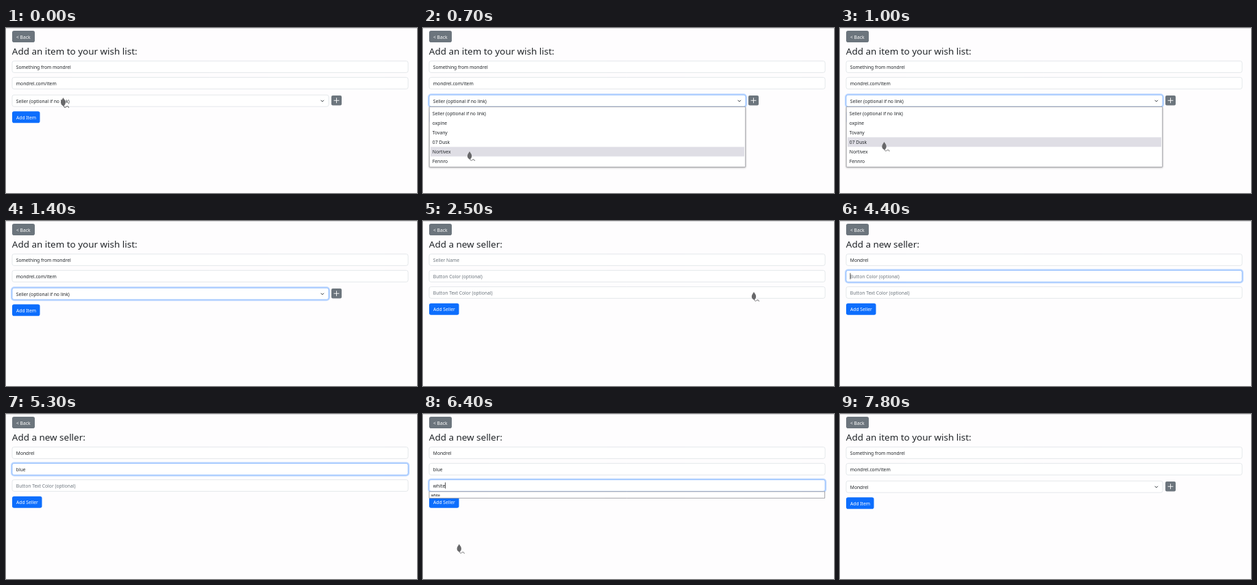
An HTML page with a canvas that plays this animation: 600 px wide and 242 px high, repeating every 7.9 s.

```html
<!DOCTYPE html>
<html lang="en">
<head>
<meta charset="utf-8">
<title>Wish list form</title>
<style>
html, body { margin: 0; width: 100%; height: 100%; overflow: hidden; background: #fefdfe; }
canvas { display: block; width: 600px; height: 242px; }
</style>
</head>
<body>
<canvas id="stage"></canvas>
<script>
const W = 600, H = 242, LOOP = 7900, STEP = 100;
const SHOP = 'Mondrel';
const SELLERS = ['Seller (optional if no link)', 'oxpine', 'Tovany', '07 Dusk', 'Nortivex', 'Fennro'];
const PAPER = '#fefdfe', INK = '#212529', MUTED = '#6c757d', GRAY = '#6c757d', BLUE = '#0d6efd';
const FONT = '"Noto Sans", "Open Sans", sans-serif';

const canvas = document.getElementById('stage');
const ctx = canvas.getContext('2d');
const dpr = window.devicePixelRatio || 1;
canvas.width = W * dpr;
canvas.height = H * dpr;

// Pointer strokes: [time, x, y] of the tip
const STROKES = [
  [[0, 83.5, 102], [100, 83.5, 102], [300, 80, 118], [600, 70, 184], [800, 66, 178],
   [1000, 64.5, 167], [1200, 62, 205], [1300, 61, 225]],
  [[1500, 330, 190], [1700, 440, 132], [2000, 486, 98], [2300, 483, 104], [2500, 483, 104],
   [2900, 300, 76], [3200, 130, 54], [3400, 130, 54]],
  [[6300, 53, 191], [6500, 52.5, 190.5], [6800, 33, 128], [7100, 31, 127],
   [7300, 36, 170], [7600, 42, 242]]
];

function pointerAt(t) {
  const path = STROKES.find(p => t >= p[0][0] && t <= p[p.length - 1][0]);
  if (!path) return null;
  const i = Math.max(1, path.findIndex(k => k[0] >= t));
  const [t0, x0, y0] = path[i - 1], [t1, x1, y1] = path[i];
  const u = (t - t0) / (t1 - t0), e = u * u * (3 - 2 * u);
  return { x: x0 + (x1 - x0) * e, y: y0 + (y1 - y0) * e };
}

function text(str, x, y, color = INK, size = 6.72) {
  ctx.font = `${size}px ${FONT}`;
  ctx.fillStyle = color;
  ctx.fillText(str, x, y);
  return x + ctx.measureText(str).width;
}

function box(x, y, w, h, r, fill, stroke, line = 0.8) {
  ctx.beginPath();
  ctx.roundRect(x, y, w, h, r);
  if (fill) { ctx.fillStyle = fill; ctx.fill(); }
  if (stroke) { ctx.strokeStyle = stroke; ctx.lineWidth = line; ctx.stroke(); }
}

function line(color, width, ...pts) {
  ctx.beginPath();
  pts.forEach(([x, y]) => ctx.lineTo(x, y));
  ctx.strokeStyle = color;
  ctx.lineWidth = width;
  ctx.stroke();
}

function button(label, x, y, w, h, fill, baseline) {
  box(x, y, w, h, 2.8, fill);
  text(label, x + 6, baseline, '#fff');
}

function field(y, value, { hint = '', focus = false, caret = false, right = 587 } = {}) {
  const w = right - 9;
  if (focus) box(9, y, w, 17, 3, null, 'rgba(13,110,253,.27)', 4);
  box(9, y, w, 17, 2.8, '#fff', focus ? '#86b7fe' : '#dee2e6');
  const end = text(value || hint, 14.8, y + 11.5, value ? INK : MUTED);
  if (caret) {
    const x = value ? end + 0.4 : 15;
    line('#222', 0.8, [x, y + 4], [x, y + 13]);
  }
}

function suggestions(y, rows) {
  const h = rows.length * 8.8 + 0.8;
  box(9, y, 577.5, h, 0, '#fff', '#8d8d94', 0.8);
  rows.forEach((row, i) => text(row, 11.8, y + 6.7 + i * 8.8, '#111', 5.05));
}

function options(pointer) {
  ctx.save();
  ctx.shadowColor = 'rgba(0,0,0,.3)';
  ctx.shadowBlur = 3 * dpr;
  ctx.shadowOffsetY = dpr;
  box(9.2, 115.6, 461.6, 88.4, 0.5, '#fff');
  ctx.restore();
  box(9.2, 115.6, 461.6, 88.4, 0.5, null, '#8d8d94', 0.8);
  const hover = pointer ? Math.floor((pointer.y - 118) / 14.1) : 0;
  SELLERS.forEach((name, i) => {
    const y = 118 + i * 14.1;
    if (i === Math.max(0, Math.min(5, hover))) {
      ctx.fillStyle = '#dfdee5';
      ctx.fillRect(11, y, 458, 14);
    }
    text(name, 13.8, y + 9.6);
  });
}

function frame(title) {
  ctx.fillStyle = PAPER;
  ctx.fillRect(0, 0, W, H);
  ctx.fillStyle = '#dcdbde';
  ctx.fillRect(0, 0, W, 1);
  button('< Back', 9, 4, 33, 17, GRAY, 15.6);
  text(title, 8.8, 39, INK, 13.45);
}

function itemPage(t, pointer) {
  const open = t >= 200 && t < 1300;
  frame('Add an item to your wish list:');
  field(48.4, 'Something from ' + SHOP.toLowerCase());
  field(72.4, SHOP.toLowerCase() + '.com/item');
  field(98.2, t > 7000 ? SHOP : SELLERS[0], { right: 471, focus: t >= 200 && t < 2300 });
  line('#343a40', 1, [459.6, 105.8], [461.8, 108], [464, 105.8]);
  box(475, 99, 15, 14.5, 2, GRAY);
  line('#fff', 0.9, [478.6, 106.3], [486.4, 106.3]);
  line('#fff', 0.9, [482.5, 102.4], [482.5, 110.2]);
  button('Add Item', 9, 122.2, 40.5, 17, BLUE, 133.8);
  if (open) options(pointer);
}

function typed(word, t, start, pace = 100) {
  return word.slice(0, Math.max(0, Math.floor((t - start) / pace) + 1));
}

function sellerPage(t) {
  const name = typed(SHOP, t, 3500, t < 3800 ? 150 : 100);
  const fill = typed('blue', t, 4800);
  const ink = t < 6200 ? typed('whi', t, 5800) : typed('white', t, 5900);
  const focus = t < 3300 ? 0 : t < 4400 ? 1 : t < 5500 ? 2 : t < 6900 ? 3 : 0;
  frame('Add a new seller:');
  field(48.4, name, { hint: 'Seller Name', focus: focus === 1, caret: focus === 1 && t >= 3500 });
  field(72.4, fill, { hint: 'Button Color (optional)', focus: focus === 2, caret: focus === 2 && t < 5200 });
  field(96.4, ink, { hint: 'Button Text Color (optional)', focus: focus === 3, caret: focus === 3 && t >= 5600 });
  button('Add Seller', 9, 120.8, 43.5, 17, BLUE, 132.2);
  if (focus === 1 && t >= 3500 && t < 4200) {
    suggestions(66, t < 3800 ? [SHOP, 'A thing I want'] : [SHOP]);
  }
  if (focus === 3 && t >= 5800 && t < 6800) {
    suggestions(113.8, t < 5900 ? ['white', 'A thing I want'] : ['white']);
  }
}

// Leaf-shaped pointer with a curled tail
function drawPointer({ x, y }, scale) {
  ctx.save();
  ctx.translate(x, y);
  ctx.scale(scale, scale);
  ctx.beginPath();
  ctx.moveTo(0, 0);
  ctx.bezierCurveTo(1.2, 2.6, 3.4, 4, 3.2, 7);
  ctx.bezierCurveTo(3, 9.6, 1.6, 11, 0.6, 11.6);
  ctx.bezierCurveTo(-1.6, 11, -3, 9.4, -3.2, 7);
  ctx.bezierCurveTo(-3.2, 4, -1.2, 2.6, 0, 0);
  ctx.fillStyle = '#68686a';
  ctx.fill();
  ctx.beginPath();
  ctx.moveTo(0.5, 11);
  ctx.bezierCurveTo(1.4, 14.2, 2.8, 13.6, 3.8, 12.6);
  ctx.bezierCurveTo(5.4, 11.2, 7, 11.6, 7.6, 14);
  ctx.strokeStyle = '#6c6c6e';
  ctx.lineWidth = 1;
  ctx.stroke();
  ctx.restore();
}

function draw(t) {
  const pointer = pointerAt(t);
  ctx.setTransform(dpr, 0, 0, dpr, 0, 0);
  if (t >= 2500 && t < 7200) sellerPage(t);
  else itemPage(t, pointer);
  if (pointer) drawPointer(pointer, t < 200 ? 1.08 : 1);
}

const begin = performance.now();
function tick() {
  const t = (performance.now() - begin) % LOOP;
  draw(Math.floor(t / STEP) * STEP);
  requestAnimationFrame(tick);
}
tick();
</script>
</body>
</html>
```
